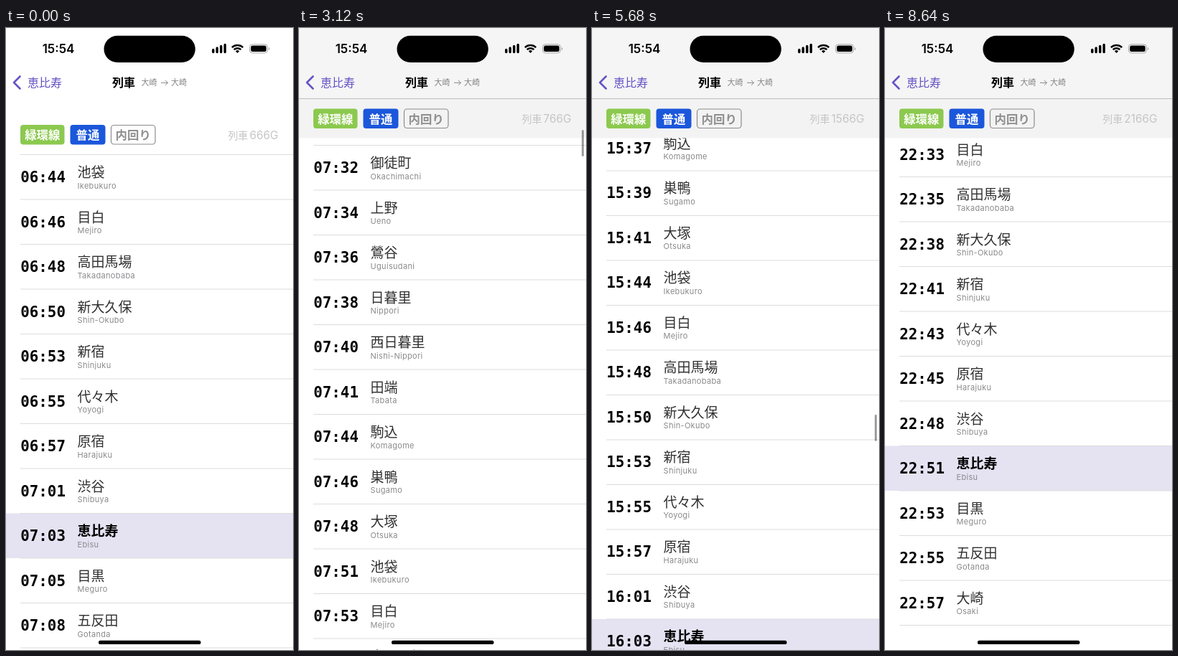
Recreate the animation shown at these times as an HTML page. Size 400 by 867 pixels, loop 8720 ms.

```html
<!DOCTYPE html>
<html lang="ja">
<head>
<meta charset="utf-8">
<title>列車</title>
<style>
  html, body { margin: 0; width: 100%; height: 100%; overflow: hidden; background: #fff; }
  svg { display: block; width: 400px; height: 867px; }
  text { font-family: Inter, "Noto Sans CJK JP", "Noto Sans CJK", sans-serif; }
  .time { font: 700 20.8px "DejaVu Sans Mono", monospace; }
  .name { font-size: 19px; font-weight: 300; fill: #303030; }
  .here { font-weight: 700; fill: #000; }
  .latin { font-size: 11px; letter-spacing: .32px; fill: #8a8a8d; }
  .chip { font-size: 16.4px; font-weight: 700; text-anchor: middle; fill: #fff; }
  .outlined { fill: #8f8f8f; }
  .train { font-size: 14px; text-anchor: end; fill: #c5c5c8; }
  .train tspan { font-size: 15.4px; }
  .route { font-size: 11px; fill: #858588; }
</style>
</head>
<body>
<svg viewBox="0 0 400 867">
  <rect width="400" height="867" fill="#fff"/>
  <g id="rows"></g>
  <g id="headers"></g>
  <rect id="bar" width="400" height="98.5"/>
  <path id="barLine" d="M0 98.5H400" stroke="#bdbdbf"/>
  <rect id="thumb" x="394" width="3" rx="1.5" fill="#000" fill-opacity=".38"/>

  <text x="73" y="35" font-size="17" font-weight="600" text-anchor="middle">15:54</text>
  <rect x="136.500" y="10.800" width="127.300" height="37.200" rx="18.600"/>
  <path d="M288.800 30.500v3M294.200 28v5.500M299.700 25.500v8M305.200 23.500v10" stroke="#000" stroke-width="3.4" stroke-linecap="round"/>
  <g fill="none" stroke="#000" stroke-width="2.4">
    <path d="M314.900 27.200a11 11 0 0 1 15.400 0M317.700 30.200a7 7 0 0 1 9.800 0"/>
    <path d="M322.600 35l-2.600-2.700a3.700 3.700 0 0 1 5.200 0z" fill="#000" stroke="none"/>
  </g>
  <rect x="339.500" y="22.800" width="25" height="12" rx="3.800" fill="none" stroke="#a5a5a5"/>
  <rect x="341.200" y="24.500" width="21.600" height="8.600" rx="2.400"/>
  <path d="M366 27v4q1.400-.6 1.400-2t-1.400-2z" fill="#a5a5a5"/>

  <path d="M19.500 67.500L11 76l8.500 8.500" fill="none" stroke="#6653c4" stroke-width="2.6" stroke-linecap="round" stroke-linejoin="round"/>
  <text x="30" y="82" font-size="16" fill="#6653c4">恵比寿</text>
  <text x="148" y="82.200" font-size="16" font-weight="700">列車</text>
  <text class="route" x="188.500" y="80.200">大崎</text>
  <path d="M216 76.300h9.500m-3.500-3.500l3.500 3.500l-3.500 3.500" fill="none" stroke="#858588"/>
  <text class="route" x="230" y="80.200">大崎</text>
  <rect x="129" y="853.800" width="142.500" height="5.200" rx="2.600"/>
</svg>
<script>
const LOOP = 8720, STEP = 80, STAGE = 867;
const BAR = 98.5, GAP = 22.5, HEAD = 55.5, ROW = 62.5, BOTTOM = 832.5;
const HOME = '恵比寿';

// station, romanised name, minutes after departure
const stations = `大崎 Osaki 0,品川 Shinagawa 3,高輪ゲートウェイ Takanawa-Gateway 5,田町 Tamachi 7,
浜松町 Hamamatsucho 9,新橋 Shimbashi 11,有楽町 Yurakucho 13,東京 Tokyo 15,神田 Kanda 17,秋葉原 Akihabara 19,
御徒町 Okachimachi 21,上野 Ueno 23,鶯谷 Uguisudani 25,日暮里 Nippori 27,西日暮里 Nishi-Nippori 29,
田端 Tabata 30,駒込 Komagome 33,巣鴨 Sugamo 35,大塚 Otsuka 37,池袋 Ikebukuro 40,目白 Mejiro 42,
高田馬場 Takadanobaba 44,新大久保 Shin-Okubo 46,新宿 Shinjuku 49,代々木 Yoyogi 51,原宿 Harajuku 53,
渋谷 Shibuya 57,恵比寿 Ebisu 59,目黒 Meguro 61,五反田 Gotanda 64,大崎 Osaki 66`
  .split(',').map(line => {
    const [name, latin, minutes] = line.trim().split(' ');
    return { name, latin, minutes: +minutes };
  });

// departures that differ from the regular pattern by a minute
const shifts = {
  '1166G': { 田端: 1, 代々木: -1 },
  '2166G': { 新大久保: 1, 新宿: 1, 代々木: 1, 原宿: 1, 恵比寿: 1, 目黒: 1 }
};

const starts = ['6:04', '7:11', '8:19', '9:27', '10:35', '11:43', '12:50', '13:57',
  '15:04', '16:11', '18:24', '19:31', '21:51'];

let end = BAR;
const sections = starts.map((start, i) => {
  const [hour, minute] = start.split(':').map(Number);
  const stops = i ? stations : stations.slice(19);
  const top = end + GAP, first = top + HEAD;
  end = first + stops.length * ROW;
  return { train: hour + '66G', depart: hour * 60 + minute, stops, top, first, end };
});
const maxScroll = end - BOTTOM;
const rowAt = (section, row, y) => sections[section].first + row * ROW - y;

const keys = [
  [1600, 0], [1680, 15.6], [2080, 360], [2400, 600], [2480, 600],
  [3120, rowAt(1, 10, 163.5)], [4960, rowAt(5, 13, 138)], [6400, rowAt(11, 10, 138.5)],
  [7320, maxScroll], [7440, maxScroll + 80], [7600, maxScroll + 50],
  [7760, maxScroll + 20], [8000, maxScroll + 4], [8400, maxScroll]
];

// monotone cubic through the keys
const slope = i => (keys[i + 1][1] - keys[i][1]) / (keys[i + 1][0] - keys[i][0]);
const tangents = keys.map((_, i) => {
  if (!i || i === keys.length - 1) return 0;
  const a = slope(i - 1), b = slope(i);
  return a * b > 0 ? 2 * a * b / (a + b) : 0;
});

function scrollAt(t) {
  if (t <= keys[0][0]) return 0;
  const i = keys.findIndex(key => key[0] >= t) - 1;
  if (i < 0) return maxScroll;
  const [t0, p0] = keys[i], [t1, p1] = keys[i + 1];
  const d = t1 - t0, u = (t - t0) / d, v = 1 - u;
  return p0 * (1 + 2 * u) * v * v + p1 * u * u * (3 - 2 * u)
    + d * u * v * (tangents[i] * v - tangents[i + 1] * u);
}

const pad = n => String(n).padStart(2, '0');
const clock = m => pad(Math.floor(m / 60) % 24) + ':' + pad(m % 60);
const line = y => `<path d="M20 ${y}H400" stroke="#dcdcde"/>`;

function rowMarkup(section, stop, y) {
  const here = stop.name === HOME;
  const minutes = section.depart + stop.minutes + (shifts[section.train]?.[stop.name] || 0);
  return (here ? `<rect y="${y}" width="400" height="${ROW}" fill="#e5e2f2"/>` : '') + line(y)
    + `<text class="time" x="20.300" y="${y + 38.5}">${clock(minutes)}</text>`
    + `<text class="name${here ? ' here' : ''}" x="99.500" y="${y + 31.5}">${stop.name}</text>`
    + `<text class="latin" x="99.500" y="${y + 47}">${stop.latin}</text>`;
}

function headerMarkup(section, y, pinned) {
  return `<g transform="translate(0 ${y})">
    <rect width="400" height="${HEAD - 0.5}" fill="${pinned ? '#f3f3f3' : '#fff'}"/>
    <rect x="20" y="14" width="61.500" height="27.500" rx="4" fill="#8cc94f"/>
    <rect x="89.500" y="14" width="49" height="27.500" rx="4" fill="#1b57db"/>
    <rect x="146.500" y="14.500" width="61.500" height="26.500" rx="4" fill="none" stroke="#8c8c8c" stroke-width="1.2"/>
    <text class="chip" x="50.800" y="34">緑環線</text>
    <text class="chip" x="114" y="34">普通</text>
    <text class="chip outlined" x="177.200" y="34">内回り</text>
    <text class="train" x="379.500" y="33.800">列車<tspan dx="2">${section.train}</tspan></text>
  </g>`;
}

const $ = id => document.getElementById(id);
const set = (id, attrs) => Object.entries(attrs).forEach(([k, v]) => $(id).setAttribute(k, v));

function render(t) {
  const scroll = scrollAt(t);
  let rows = '', headers = '';
  sections.forEach(section => {
    const bottom = section.end - scroll;
    const natural = section.top - scroll;
    if (bottom < 0 || natural > STAGE) return;
    section.stops.forEach((stop, n) => {
      const y = section.first + n * ROW - scroll;
      if (y > 30 && y < STAGE) rows += rowMarkup(section, stop, y);
    });
    rows += line(bottom);
    const y = Math.min(Math.max(natural, BAR), bottom - HEAD);
    headers += headerMarkup(section, y, natural <= BAR);
  });
  $('rows').innerHTML = rows;
  $('headers').innerHTML = headers;

  const moved = scroll > 0;
  set('bar', { fill: moved ? '#f5f5f5' : '#fff' });
  set('barLine', { opacity: moved ? 1 : 0 });

  const over = Math.max(0, scroll - maxScroll);
  const height = Math.max(7, 37 - over * 0.6);
  const low = 138.8 + Math.min(scroll, maxScroll) * 0.02735 + Math.min(over, 50) * 0.22;
  const fade = Math.min(1, Math.max(0, (8560 - t) / 320));
  set('thumb', { y: low - height, height, opacity: moved ? fade : 0 });
}

let shown = -1;
const origin = performance.now();
function tick() {
  const t = Math.floor((performance.now() - origin) % LOOP / STEP) * STEP;
  if (t !== shown) render(shown = t);
  requestAnimationFrame(tick);
}
tick();
</script>
</body>
</html>
```
